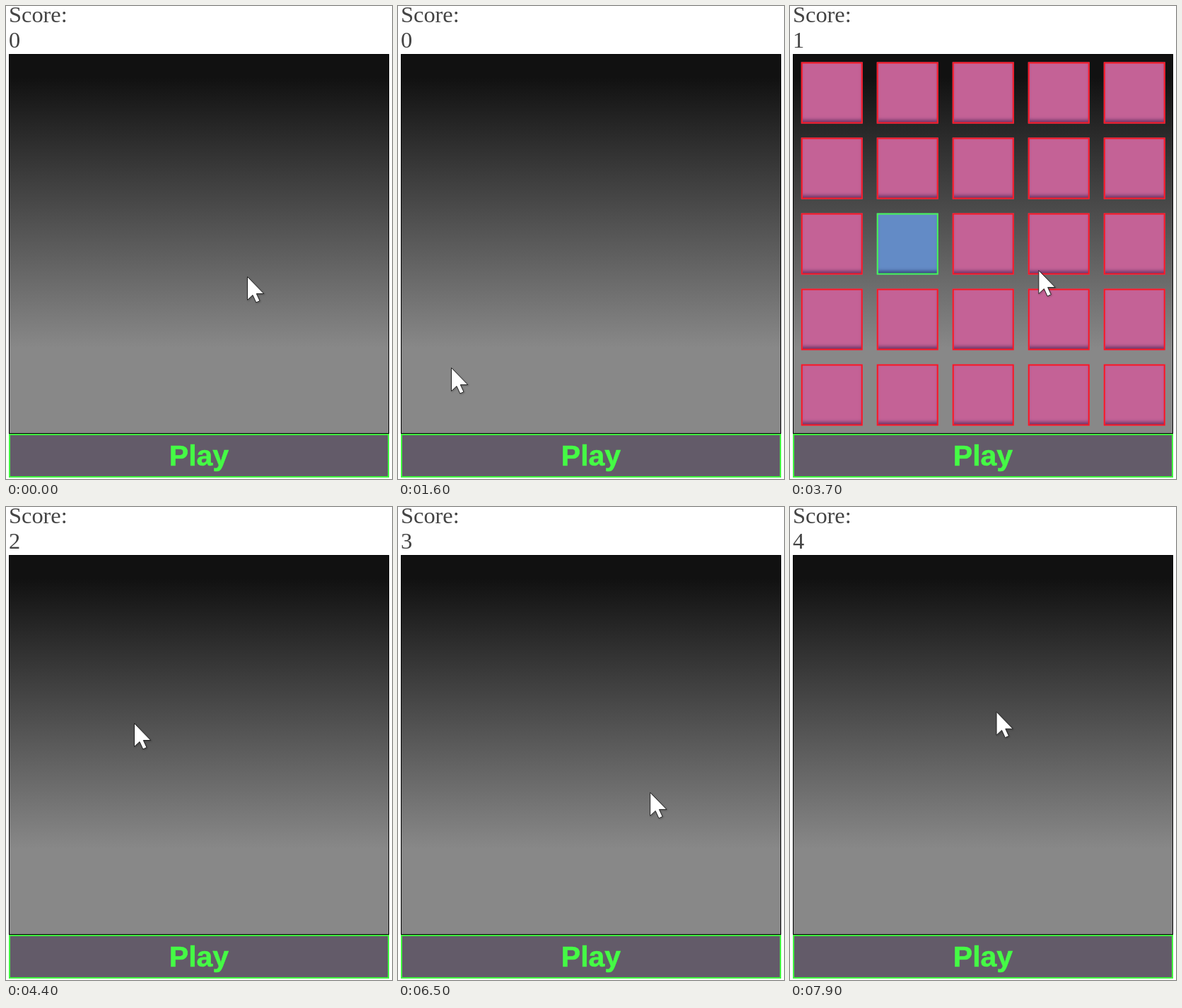
Recreate the animation shown at these times as an HTML page. Size 546 px wide and 670 px high, loop 8 s.

```html
<!DOCTYPE html>
<html lang="en">
<head>
<meta charset="utf-8">
<title>Tile game</title>
<style>
  html, body { margin: 0; width: 100%; height: 100%; overflow: hidden; background: #fff; }
  #stage { position: relative; width: 546px; height: 670px; overflow: hidden; }
  #stage > * { position: absolute; box-sizing: border-box; }
  .label { left: 4px; font: 32.4px/36px "Liberation Serif", "Times New Roman", serif; color: #444; }
  #board {
    left: 4px; top: 68px; width: 538px; height: 538px; border: 1px solid #000;
    background: linear-gradient(#111 6%, #888 77.5%);
  }
  #play {
    left: 4px; top: 606px; width: 538px; height: 62px; border: 2px solid #40f840;
    background: #635b69; color: #45fb45; text-align: center;
    font: bold 41px/58px "Liberation Sans", Arial, sans-serif;
    -webkit-text-stroke: .6px #45fb45;
  }
  #grid { transform: translate(-.25px, -.5px); }
  .tile {
    position: absolute; box-sizing: border-box; width: 87px; height: 87px;
    border: 2px solid #f81824; background: #c46296;
    box-shadow: inset 0 -6px 5px -3px #6a3568;
  }
  .tile.target { border-color: #46f552; background: #638bc6; box-shadow: inset 0 -6px 5px -3px #35467c; }
  #cursor { left: 0; top: 0; overflow: visible; filter: drop-shadow(1px 1px 1px rgba(0, 0, 0, .25)); }
</style>
</head>
<body>
<div id="stage">
  <div class="label" style="top:-6px">Score:</div>
  <div class="label" id="score" style="top:30px">0</div>
  <div id="board"><div id="grid"></div></div>
  <div id="play">Play</div>
  <svg id="cursor" width="26" height="40">
    <path d="M.5 .5V33.5L8 26.5L12.8 37L18 34.6L13.3 24.5H23.8Z" fill="#fff" stroke="#222" stroke-width="1"/>
  </svg>
</div>
<script>
const LOOP = 8000, STEP = 100;
const SIZE = 5, PITCH = 107, INSET = 11;
const FIRST_CLICK = 1400, ROUND = 1470, SHOWN = 700;

// Where the pointer clicks in each round; it rests at a slowly drifting home.
const clicks = [[75, 512], [485, 322], [181, 306], [370, 527], [175, 147]];
const homeStart = [341, 383], homeEnd = [355, 367];

const $ = id => document.getElementById(id);
const grid = $("grid"), score = $("score"), cursor = $("cursor");

const tiles = Array.from({ length: SIZE * SIZE }, (_, i) => {
  const tile = document.createElement("div");
  tile.className = "tile";
  tile.style.left = INSET + PITCH * (i % SIZE) + "px";
  tile.style.top = INSET + PITCH * Math.floor(i / SIZE) + "px";
  return grid.appendChild(tile);
});

const clamp = (v, lo, hi) => Math.min(hi, Math.max(lo, v));
const mix = (a, b, k) => a.map((v, i) => v + (b[i] - v) * k);
const clickTime = n => FIRST_CLICK + ROUND * n;
const tileAt = ([x, y]) => Math.floor((y - 70) / PITCH) * SIZE + Math.floor((x - 5) / PITCH);

function ease(k) {
  k = clamp(k, 0, 1);
  return k * k * (3 - 2 * k);
}

function pointerAt(t) {
  const n = clamp(Math.floor((t - FIRST_CLICK + 550) / ROUND), 0, clicks.length - 1);
  const d = t - clickTime(n);
  const reach = ease((d + 550) / 350) - ease((d - 200) / 700);
  return mix(mix(homeStart, homeEnd, t / LOOP), clicks[n], reach);
}

function draw(t) {
  const done = clamp(Math.floor((t - FIRST_CLICK) / ROUND) + 1, 0, clicks.length);
  const shown = done < clicks.length && t >= clickTime(done) - SHOWN;
  grid.style.display = shown ? "block" : "none";
  if (shown) {
    const target = tileAt(clicks[done]);
    tiles.forEach((tile, i) => tile.classList.toggle("target", i === target));
  }
  // the first click misses
  score.textContent = Math.max(0, done - 1);
  const [x, y] = pointerAt(t);
  cursor.style.transform = `translate(${x}px, ${y}px)`;
}

function tick() {
  draw(Math.floor(performance.now() % LOOP / STEP) * STEP);
  requestAnimationFrame(tick);
}
tick();
</script>
</body>
</html>
```
